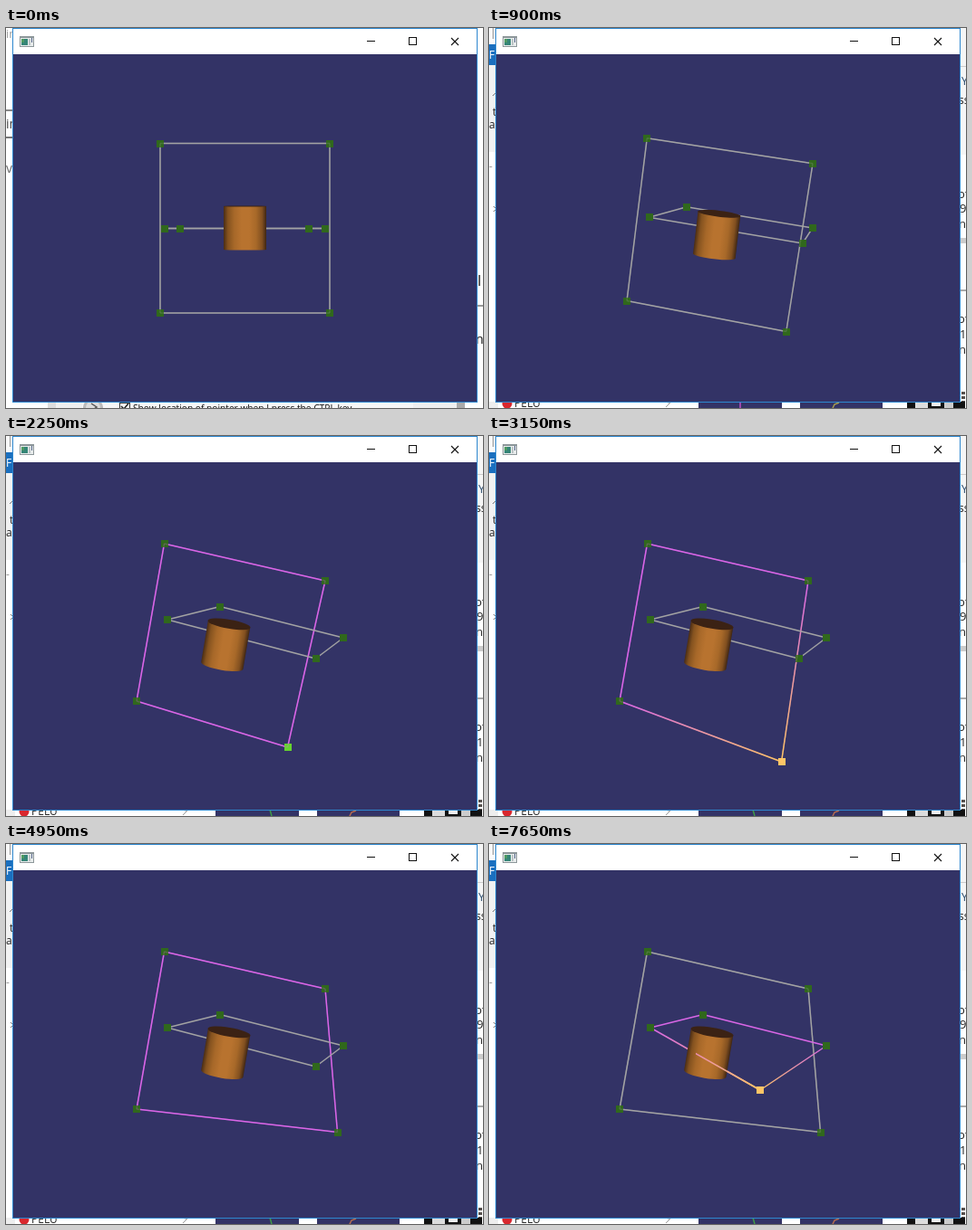
These frames come from a looping animation (526 by 420 pixels, 8 s). An HTML page with a canvas:

```html
<!DOCTYPE html>
<html lang="en">
<head>
<meta charset="utf-8">
<title>Handle dragging</title>
<style>
html, body { margin: 0; width: 100%; height: 100%; overflow: hidden; background: #fff; }
canvas { display: block; }
</style>
</head>
<body>
<canvas id="stage" width="526" height="420"></canvas>
<script>
const ctx = document.getElementById('stage').getContext('2d');
const LOOP = 8000, STEP = 450;
const GREY = '#a3a3a3', PINK = '#d966e6', GOLD = '#ffc566';
const GREEN = '#30681c', LIME = '#66d42e', NAVY = '#333366';
const UI = '"Open Sans", "Noto Sans", sans-serif';

// Corners of both frames, plus the cylinder, for three camera angles
const views = [
  { outer: [[170, 127.5], [357, 127.5], [357, 315], [170, 315]],
    inner: [[175, 221.5], [192, 221.5], [334, 221.5], [352, 221.5]],
    can: { x: 263.5, y: 221, h: 48, lid: 0.6, turn: 0 } },
  { outer: [[174, 124.5], [362, 139.5], [345, 327], [160, 310]],
    inner: [[175, 215.5], [200, 207], [341.5, 219], [350, 230]],
    can: { x: 260, y: 226.5, h: 47.5, lid: 1.8, turn: 4 } },
  { outer: [[174.5, 119], [352, 160], [310.5, 344], [144, 293]],
    inner: [[178, 203], [236, 188.5], [372, 223], [341.5, 246]],
    can: { x: 242.2, y: 230.8, h: 46.5, lid: 5, turn: 9.5 } }
];

const outerPath = [[314, 350], [322.5, 360], [338, 356], [354, 340], [365.5, 318.5]];
const innerPath = [[333, 251], [318, 260], [299, 272]];

const mix = (a, b) => (a + b) / 2;
const mixQuad = (p, q) => p.map((c, i) => c.map((v, k) => mix(v, q[i][k])));

function mixView(a, b) {
  const can = {};
  for (const k in a.can) can[k] = mix(a.can[k], b.can[k]);
  return { outer: mixQuad(a.outer, b.outer), inner: mixQuad(a.inner, b.inner), can };
}
const halfway = mixView(views[1], views[2]);

function sceneAt(n) {
  const view = [views[0], views[1], halfway][n] || views[2];
  const outer = { pts: view.outer.slice(), active: 2 };
  const inner = { pts: view.inner.slice(), active: 3 };
  if (n >= 6) outer.pts[2] = outerPath[Math.min(n - 6, 4)];
  if (n >= 15) inner.pts[3] = innerPath[n - 15];
  outer.lit = n >= 5 && n <= 11;
  outer.hover = n === 5;
  outer.drag = n >= 6 && n <= 10;
  inner.lit = n >= 14;
  inner.hover = n === 14;
  inner.drag = n >= 15;
  const front = n === 17 ? 228 : n === 16 ? 247 : 0;
  return { outer, inner, can: view.can, front };
}

function box(x, y, w, h, color) {
  ctx.fillStyle = color;
  ctx.fillRect(x, y, w, h);
}

function label(str, x, y, size = 13, color = '#222') {
  ctx.font = size + 'px ' + UI;
  ctx.fillStyle = color;
  ctx.fillText(str, x, y);
}

function stroke(pts, color, width = 1.5) {
  ctx.beginPath();
  pts.forEach(([x, y]) => ctx.lineTo(x, y));
  ctx.strokeStyle = color;
  ctx.lineWidth = width;
  ctx.stroke();
}

function disc(x, y, r, color) {
  ctx.beginPath();
  ctx.arc(x, y, r, 0, Math.PI * 2);
  ctx.fillStyle = color;
  ctx.fill();
}

function edge(quad, i) {
  const j = (i + 1) % 4, a = quad.pts[i], b = quad.pts[j];
  let color = quad.lit ? PINK : GREY;
  if (quad.drag && (i === quad.active || j === quad.active)) {
    color = ctx.createLinearGradient(...a, ...b);
    color.addColorStop(0, i === quad.active ? GOLD : PINK);
    color.addColorStop(1, j === quad.active ? GOLD : PINK);
  }
  stroke([a, b], color);
}

function edges(quad) {
  for (let i = 0; i < 4; i++) edge(quad, i);
}

function handles(quad) {
  quad.pts.forEach(([x, y], i) => {
    const on = i === quad.active;
    const color = on && quad.drag ? GOLD : on && quad.hover ? LIME : GREEN;
    box(Math.round(x - 4), Math.round(y - 4), 8, 8, color);
  });
}

function cylinder({ x, y, h, lid, turn }) {
  const r = 23.5, half = h / 2;
  ctx.save();
  ctx.translate(x, y);
  ctx.rotate(turn * Math.PI / 180);
  const shade = ctx.createLinearGradient(-r, 0, r, 0);
  const tones = ['#4a2d15', '#84521f', '#a76829', '#b8732f', '#b8732f', '#a86929', '#825020', '#3f2613'];
  const stops = [0, 0.1, 0.25, 0.42, 0.6, 0.76, 0.9, 1];
  stops.forEach((s, i) => shade.addColorStop(s, tones[i]));
  ctx.beginPath();
  ctx.moveTo(-r, -half);
  ctx.lineTo(r, -half);
  ctx.ellipse(0, half, r, lid, 0, 0, Math.PI);
  ctx.closePath();
  ctx.fillStyle = shade;
  ctx.fill();
  ctx.beginPath();
  ctx.ellipse(0, -half, r + 0.3, lid, 0, 0, Math.PI * 2);
  ctx.fillStyle = '#3b2214';
  ctx.fill();
  ctx.restore();
}

// Slivers of the dialog visible behind the window at the start
function dialogBehind() {
  label('in', 0, 11, 13, '#999');
  label('in', 0, 111, 14, '#444');
  label('vi', 0, 160, 14, '#666');
  box(0, 90, 8, 2, '#888');
  box(0, 120, 8, 2, '#777');
  label('l', 520, 285, 16, '#111');
  label('nc', 518, 349, 14, '#111');
  box(519, 306, 7, 2, '#999');
  box(46, 413, 460, 7, '#f0f0f0');
  box(46, 413, 9, 7, '#ddd');
  box(497, 413, 9, 7, '#aaa');
  box(84, 413, 365, 7, '#f7f7f7');
  disc(96, 420, 11, '#bbb');
  disc(96, 420, 8, '#ddd');
  stroke([[94, 415], [100, 419], [94, 423]], '#555');
  ctx.strokeStyle = '#333';
  ctx.lineWidth = 1;
  ctx.strokeRect(125.5, 414.5, 11, 11);
  stroke([[127, 418], [130, 421], [135, 415]], '#222');
  label('Show location of pointer when I press the CTRL key', 140, 424, 10.2, '#111');
}

function check(x) {
  disc(x, 418, 10, '#249b38');
  stroke([[x - 5, 416], [x - 1, 420], [x + 6, 414]], '#fff', 2.5);
}

// Slivers of the file browser and page behind the window
function browserBehind(n) {
  box(0, 0, 8, 18, '#fafafa');
  box(4, 0, 1, 12, '#999');
  box(0, 18, 8, 23, '#1a6fbf');
  label('Fil', 0, 34, 12, '#fff');
  box(0, 41, 8, 96, '#f2f2f2');
  stroke([[4, 75], [7, 72], [10, 75]], '#777', 1);
  label('t', 4, 97, 12);
  label('ac', 0, 111, 12);
  label('-', 0, 157, 12, '#999');
  stroke([[5, 197], [8, 200], [5, 203]], '#777', 1);

  box(519, 0, 7, 140, '#f6f6f6');
  box(519, 42, 7, 1, '#ccc');
  label('Y', 521, 63, 12, '#246');
  label('ss', 518, 84, 12);
  const dy = n === 1 ? 0 : 18;
  label('ot', 517, 170 + dy, 13);
  label('9', 519, 186 + dy, 13);
  label('n', 518, 203 + dy, 13);
  box(519, 214 + dy, 7, 6, '#ccc');
  box(519, 271 + dy, 7, 2, '#aaa');
  label('ot', 517, 308 + dy, 13);
  label('1', 519, 325 + dy, 13);
  label('n', 518, 342 + dy, 13);
  for (let y = 384 + dy; y < 420; y += 5) box(521, y, 4, 3, '#554f4c');

  box(0, 413, 526, 7, '#fff');
  box(0, 413, 10, 7, '#eee');
  disc(20, 415, 5.5, '#d9272e');
  label('PELU', 28, 419, 12, '#222');
  stroke([[195, 419], [200, 414], [197, 414]], '#999', 1);
  box(231, 413, 92, 7, NAVY);
  box(343, 413, 91, 7, NAVY);
  if (n === 1) {
    [241, 352, 463].forEach(check);
    stroke([[378, 413], [384, 416], [391, 415]], '#4b7a50', 1);
    return;
  }
  const early = n < 5;
  stroke(early ? [[277, 413], [277, 420]] : [[291, 413], [293, 420]], early ? '#c050c8' : '#3f9b46');
  stroke([[379, 420], [381, 416], [386, 414]], early ? '#a8a050' : '#b56c50');
  box(461, 413, 64, 7, '#111');
  box(470, 414, 14, 6, '#ddd');
  box(488, 414, 10, 4, '#eee');
  box(502, 413, 10, 7, '#ccc');
}

function windowFrame() {
  box(7, 0, 513, 414, '#2d87cf');
  box(8, 1, 511, 28, '#fff');
  box(8, 29, 511, 384, NAVY);

  box(15, 9, 16, 12, '#8c9699');
  box(16, 11, 14, 9, '#e8ecec');
  box(17, 12, 7, 7, '#358577');
  box(17, 12, 3, 4, '#4f9a62');
  box(25, 12, 2, 7, '#bcc4c6');
  box(28, 11, 1, 5, '#56658a');

  box(398, 14, 9, 1, '#111');
  ctx.strokeStyle = '#111';
  ctx.lineWidth = 1;
  ctx.strokeRect(444.5, 10.5, 8, 8);
  stroke([[491, 11], [499, 19]], '#111', 1.1);
  stroke([[499, 11], [491, 19]], '#111', 1.1);
}

function draw(n) {
  const { outer, inner, can, front } = sceneAt(n);
  box(0, 0, 526, 420, '#fff');
  if (n === 0) dialogBehind(); else browserBehind(n);
  windowFrame();
  edges(outer);
  edges(inner);
  cylinder(can);
  if (front) {
    // The dragged edge passes through the cylinder and comes out in front
    ctx.save();
    ctx.beginPath();
    ctx.rect(front, 29, 519 - front, 384);
    ctx.clip();
    edge(inner, 3);
    ctx.restore();
  }
  handles(outer);
  handles(inner);
  ctx.globalAlpha = 0.22;
  edges(outer);
  ctx.globalAlpha = 1;
}

function tick() {
  draw(Math.floor(performance.now() % LOOP / STEP));
  requestAnimationFrame(tick);
}
tick();
</script>
</body>
</html>
```
